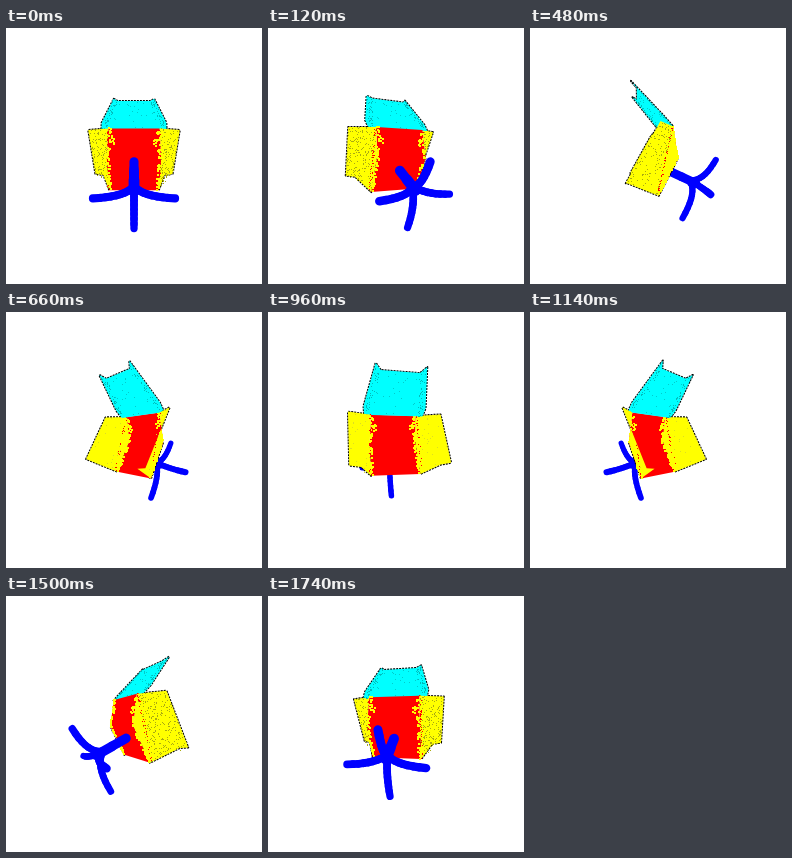
An HTML page with a canvas for the animation above (1.8 s loop, 256 by 256 pixels).

```html
<!DOCTYPE html>
<html>
<head>
<meta charset="utf-8">
<style>
html, body { margin: 0; width: 256px; height: 256px; overflow: hidden; background: #fff; }
canvas { display: block; }
</style>
</head>
<body>
<canvas id="stage" width="256" height="256"></canvas>
<script>
const ctx = document.getElementById('stage').getContext('2d');
const STEP = 60, STEPS = 30, CAMERA = 190;
const RED = '#f00', YELLOW = '#ff0', CYAN = '#0ff', BLUE = '#00f';
let turn = 0, seed = 1;

const random = () => (seed = seed * 16807 % 2147483647) / 2147483647;
const mix = (a, b, k) => a.map((v, i) => v + (b[i] - v) * k);
const mirror = ([x, y, z], side) => [x * side, y, z];

// Turn about the vertical axis, then project in perspective: [x, y, depth, scale].
function project([x, y, z]) {
  const c = Math.cos(turn), s = Math.sin(turn);
  const depth = z * c - x * s, k = CAMERA / (CAMERA - depth);
  return [128 + (x * c + z * s) * k, 128 + y * k, depth, k];
}

// Chair geometry, right half: x right, y down, z towards the viewer.
const seatTop = [24, -26, 11], seatMid = [25, 2, 15], seatEnd = [25, 34.5, -2];
const armTop = [46.5, -26.5, -3], armEnd = [44.5, 20.5, -29], armNotch = [35, 22, -28];
const backHalf = [[31, -25.5, 9], [32, -33, 2], [23, -65, -26], [18, -61, -21]];
const poleTop = [0, 14, 9], hub = [0, 28, 39], legTop = [0, 24.5, 32], bend = [0, 31, 44];
const feet = [[32, 33, 42], [-32, 33, 42], [0, 63, 25], [0, 4, 60]];

const both = half => [...half.map(p => mirror(p, -1)), ...half.map(p => mirror(p, 1)).reverse()];
const meanDepth = points => points.reduce((sum, p) => sum + project(p)[2], 0) / points.length;

function trace(points) {
  ctx.beginPath();
  points.forEach(p => ctx.lineTo(...project(p).slice(0, 2)));
}

function outline(points) {
  trace(points);
  ctx.setLineDash([2, 1]);
  ctx.lineWidth = 2;
  ctx.lineJoin = 'round';
  ctx.lineCap = 'butt';
  ctx.strokeStyle = '#000';
  ctx.stroke();
  ctx.setLineDash([]);
}

function panel(points, color) {
  trace(points);
  ctx.fillStyle = color;
  ctx.fill();
}

function dot(point, color, size = 1) {
  const [x, y] = project(point);
  ctx.fillStyle = color;
  ctx.fillRect(Math.round(x - size / 2), Math.round(y - size / 2), size, size);
}

function speckle([a, b, c, d], count, color, reach = 1) {
  for (let i = 0; i < count; i++) {
    const u = random() * reach, v = random();
    dot(mix(mix(a, b, u), mix(d, c, u), v), color);
  }
}

function drawSeat(points) {
  panel(points, RED);
  seed = 31;
  for (const side of [-1, 1]) {
    for (let i = 0; i < 55; i++) {
      const k = random() * 2;
      const p = k < 1 ? mix(seatTop, seatMid, k) : mix(seatMid, seatEnd, k - 1);
      const inset = random() * (k > 0.2 && k < 0.6 ? 7 : 2.5);
      dot(mirror([p[0] - inset, p[1], p[2]], side), YELLOW, 2);
    }
  }
}

function drawArm(points, side) {
  panel(points, YELLOW);
  const quad = [seatTop, armTop, armEnd, seatEnd].map(p => mirror(p, side));
  const [a, b, c] = quad.map(project);
  const area = (b[0] - a[0]) * (c[1] - b[1]) - (b[1] - a[1]) * (c[0] - b[0]);
  const outside = area * side > 0;
  seed = 57 + side;
  speckle(quad, Math.abs(area) / (outside ? 7 : 50), outside ? '#aa1' : '#dd2');
  speckle(quad, outside ? 35 : 20, RED, 0.08);
}

function drawBack(points) {
  panel(points, CYAN);
  seed = 83;
  const [low, , top, inner] = backHalf;
  for (const side of [-1, 1]) {
    const wing = [low, [low[0] - 5, low[1], low[2]], inner, top].map(p => mirror(p, side));
    speckle(wing, 35, '#0bb');
  }
  speckle([mirror(low, -1), low, inner, mirror(inner, -1)], 25, '#0cc');
}

function rod(points, width) {
  ctx.strokeStyle = BLUE;
  ctx.lineCap = 'round';
  const shown = points.map(project);
  for (let i = 1; i < shown.length; i++) {
    const a = shown[i - 1], b = shown[i];
    ctx.lineWidth = width * (a[3] + b[3]) / 2;
    ctx.beginPath();
    ctx.moveTo(a[0], a[1]);
    ctx.lineTo(b[0], b[1]);
    ctx.stroke();
  }
}

function drawBase() {
  rod([poleTop, mix(poleTop, hub, 0.5), hub], 9);
  for (const foot of feet) {
    const knee = mix(bend, foot, 0.15), curve = [];
    for (let k = 0; k <= 1.001; k += 0.1) {
      curve.push(mix(mix(legTop, knee, k), mix(knee, foot, k), k));
    }
    rod(curve, 6.3);
  }
}

function draw(step) {
  turn = step / STEPS * 2 * Math.PI;
  ctx.fillStyle = '#fff';
  ctx.fillRect(0, 0, 256, 256);
  const baseInFront = Math.cos(turn) > 0;
  if (!baseInFront) drawBase();

  const parts = [
    { points: both([seatEnd, seatMid, seatTop]), paint: drawSeat },
    { points: both(backHalf), paint: drawBack, edged: true }
  ];
  for (const side of [-1, 1]) {
    const points = [seatTop, armTop, armEnd, armNotch, seatEnd, seatMid].map(p => mirror(p, side));
    parts.push({ points, paint: p => drawArm(p, side), edged: true });
  }
  // Outlines go below all fills, so only the silhouette keeps its edge.
  parts.filter(part => part.edged).forEach(part => outline(part.points));
  parts.forEach(part => part.depth = meanDepth(part.points));
  parts.sort((a, b) => a.depth - b.depth).forEach(part => part.paint(part.points));

  if (baseInFront) drawBase();
}

const start = performance.now();
function tick() {
  draw(Math.floor((performance.now() - start) / STEP) % STEPS);
  requestAnimationFrame(tick);
}
tick();
</script>
</body>
</html>
```
